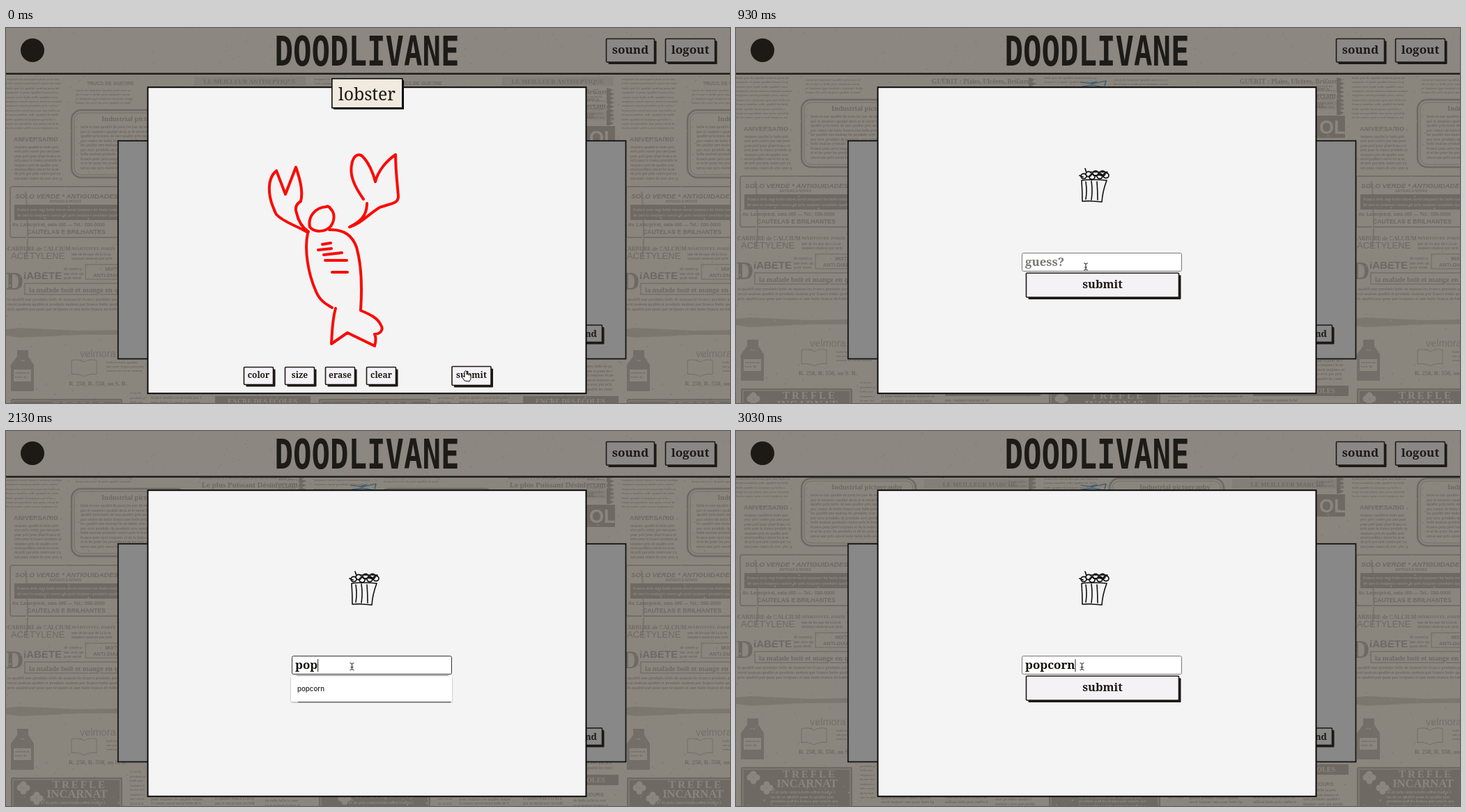
An HTML page that plays this animation: 1039 px wide and 539 px high, repeating every 3180 ms.

```html
<!DOCTYPE html>
<html lang="en">
<head>
<meta charset="utf-8">
<title>Drawing game</title>
<style>
html, body { margin: 0; width: 100%; height: 100%; overflow: hidden; background: #8a857d; }
svg { display: block; width: 100vw; height: 100vh; }
text { white-space: pre; }
.ui { font-family: "Noto Serif", serif; font-weight: 700; fill: #1d1a16; }
.list { font: 500 9.7px Inter, sans-serif; fill: #222; }
.serif { font-family: "Liberation Serif", serif; }
.sans { font-family: "Liberation Sans", sans-serif; }
.b { font-weight: 700; }
.i { font-style: italic; }
.title { font: 700 44px "DejaVu Sans Mono", monospace; fill: #1d1b17; }
.pen { fill: none; stroke-linecap: round; stroke-linejoin: round; }
</style>
</head>
<body>
<svg id="stage" viewBox="0 0 1039 539" preserveAspectRatio="none"></svg>
<script>
const INK = '#6e6a63', PAPER = '#8a857d', DARK = '#1d1a16';

let seed = 11;
const rnd = () => (seed = (seed * 16807) % 2147483647) / 2147483647;

const rect = (x, y, w, h, fill, more = '') =>
  `<rect x="${x}" y="${y}" width="${w}" height="${h}" fill="${fill}" ${more}/>`;
const text = (x, y, str, size, cls = 'ui', more = '') =>
  `<text x="${x}" y="${y}" font-size="${size}" class="${cls}" ${more}>${str}</text>`;
const path = (d, color, width) =>
  `<path class="pen" d="${d}" stroke="${color}" stroke-width="${width}"/>`;
const group = (id, inner) => `<g id="${id}">${inner}</g>`;
const mid = ' text-anchor="middle"';
const ink = `fill="${INK}"`, light = `fill="${PAPER}"`;

function button(x, y, w, h, label, size, fill = '#f4f2f5', depth = 3) {
  return rect(x + depth, y + depth, w, h, DARK, 'rx="1"') +
    rect(x, y, w, h, fill, `stroke="${DARK}" stroke-width="1.6" rx="1"`) +
    text(x + w / 2, y + h / 2 + size * .28, label, size, 'ui', mid);
}

// Paragraph of tiny print, cut to about the given width
const words = 'de la maison pour les produits avec une belle qualité toujours prix franco par boîte et contre envoi'.split(' ');
function print(x, y, w, rows, gap = 6.5, size = 5.5, more = ink) {
  let out = '';
  for (let r = 0; r < rows; r++) {
    let line = '';
    while (line.length < w / size * 2.1) line += words[Math.floor(rnd() * words.length)] + ' ';
    out += text(x, y + r * gap, line.slice(0, w / size * 2.1), size, 'serif b', more);
  }
  return out;
}

function specks(w, h, n, color, size) {
  let d = '';
  for (let i = 0; i < n; i++) {
    const s = size * (.4 + rnd());
    d += `M${(rnd() * w).toFixed(1)} ${(rnd() * h).toFixed(1)}h${s.toFixed(1)}v${s.toFixed(1)}h-${s.toFixed(1)}z`;
  }
  return `<path d="${d}" fill="${color}"/>`;
}

function newsprint() {
  const box = (x, y, w, h, rx = 0, sw = 1) =>
    rect(x, y, w, h, 'none', `stroke="${INK}" stroke-width="${sw}" rx="${rx}"`);
  const banner = (y, str) =>
    rect(270, y, 160, 13, INK, 'opacity=".25"') + text(350, y + 10, str, 9, 'serif b', mid);
  const leaf = (x, y) => [[-5, 0], [5, 0], [0, -5], [0, 5]]
    .map(([a, b]) => `<circle cx="${x + a}" cy="${y + b}" r="4.5" ${light}/>`).join('');
  const zigzag = Array.from({ length: 9 }, (_, i) => `L431 ${89 + i * 6}L424 ${92 + i * 6}`).join('');
  return `<g fill="${INK}">` + [
    specks(442, 620, 600, '#7f7a73', 1.5),
    // top
    text(116, 82, 'TRUCS DE GUERRE', 7, 'sans b'),
    print(0, 75, 86, 12, 6.4, 5),
    print(100, 91, 95, 4, 6, 5),
    banner(70, 'LE MEILLEUR ANTISEPTIQUE'),
    text(354, 95, 'GUÉRIT : Plaies, Ulcères, Brûlures,', 9.5, 'serif b', mid),
    print(278, 104, 150, 1, 6, 6),
    text(350, 116, 'Le plus Puissant Désinfectant', 11, 'serif b', mid),
    banner(119.5, 'LE MEILLEUR MARCHÉ'),
    `<path d="M420 86${zigzag}L420 140Z"/>`,
    print(391, 100, 29, 6, 6, 5),
    rect(345, 141, 87, 32, INK),
    text(395, 167, 'OL', 27, 'sans b', light),
    // framed notice
    box(94, 118, 164, 97, 14, 2.6),
    box(98, 122, 156, 89, 10, .8),
    text(137, 134, 'Industrial pictography', 10.5, 'serif b'),
    print(107, 144, 140, 10, 6.5, 5.6),
    text(11, 163, 'ANIVERSARIO', 9.2, 'sans b'),
    print(12, 173, 75, 8, 6.4, 5.2),
    // antiques
    box(6, 228, 203, 73, 3, 1.4),
    text(13, 244.5, 'SOLO VERDE * ANTIGUIDADES', 9.8, 'sans b i'),
    text(62, 251, 'ANTIGAS E NOVAS', 5, 'sans b'),
    rect(12, 254, 190, 22, INK),
    print(16, 263, 180, 2, 8, 6, light),
    text(9, 285, 'Av. Laranjeiral, sala 000 — Tel.: 000-0000', 6.9, 'sans b'),
    text(30, 296, 'CAUTELAS E BRILHANTES', 8.6, 'sans b'),
    // acetylene
    text(2, 320, 'CARBURE de CALCIUM', 8, 'serif b'),
    text(94, 319, 'MARTOVEL PARIS', 7, 'serif b'),
    text(7, 332, 'ACETYLENE', 13, 'sans'),
    print(94, 327, 68, 2, 6, 5.5),
    // diabetes
    text(0, 376, 'D', 35, 'serif b'),
    text(25, 361, 'IABETE', 15, 'sans b'),
    print(83, 348, 29, 3, 6.5, 5.5),
    box(114, 340, 89, 21),
    text(158, 349, 'MIXTURE', 7, 'sans b', mid),
    text(158, 358, 'ANTI-DIABÉTIQUE', 7.5, 'sans b', mid),
    box(27, 367, 176, 16, 0, 1.2),
    text(33, 380, 'la malade boit et mange en qu.', 10.5, 'serif b'),
    print(2, 392, 198, 3, 7, 6),
    // fountain pen
    '<path d="M0 433L20 431L105 435L203 433L442 432V440L105 441L20 445L0 442Z" opacity=".5"/>',
    text(106, 473, 'velmora de luxe', 14.5, 'sans', 'opacity=".75"'),
    // bottle and book
    '<path d="M16 463h16v9l8 12v38H7V484l9-12z" opacity=".8"/>',
    rect(11, 491, 25, 17, PAPER),
    print(13, 497, 20, 2, 6, 5),
    `<path d="M94 478q10-3 18 2q9-5 18-2v20q-10-2-18 3q-9-5-18-3z" fill="none" stroke="${INK}" opacity=".8"/>`,
    print(144, 482, 58, 3, 6, 5),
    text(90, 514, 'R. 250, R. 550, on S. R.', 8.6, 'serif b'),
    print(178, 526, 24, 9, 6.5, 5),
    // clover
    rect(7, 533, 160, 90, INK, 'rx="2"'),
    box(10, 536, 154, 84).replace(INK, PAPER),
    leaf(25, 548), leaf(44, 563),
    text(106, 548, 'TREFLE', 15, 'serif b', light + mid + ' letter-spacing="3"'),
    text(102, 562, 'INCARNAT', 16.5, 'serif b', light + mid),
    print(50, 571, 110, 4, 6.5, 6, light),
    // bottom middle
    rect(300, 529, 137, 15, INK),
    text(368, 540, 'ENCRE DES ÉCOLES', 10, 'serif b', light + mid),
    print(208, 533, 86, 9, 6.5, 5.5),
    print(300, 552, 70, 6, 6.5, 5.5),
    text(372, 560, 'CONCOURS', 7.5, 'sans b'),
    print(372, 568, 62, 4, 6.5, 5.5),
    print(391, 488, 45, 6, 6.5, 5.5),
    // crease
    `<path d="M30 270q3 30-1 60M28 235l2 20" fill="none" stroke="${INK}" stroke-width="2" opacity=".6"/>`,
    // worn print
    specks(442, 620, 900, PAPER, 1.6)
  ].join('') + '</g>';
}

const lobster = path(
  'M386 207C376 217 375 238 384 259Q386 265 388 268C399 280 418 284 433 294' +
  'M388 205L401 239L416 200C421 215 427 234 423 249Q413 255 417 266C420 280 427 288 434 293' +
  'M436 286C433 271 444 258 459 257Q463 255 466 260C473 267 471 278 466 285C458 294 442 294 436 286' +
  'M433 295C428 318 433 352 445 379C451 393 460 397 468 402' +
  'M464 290C485 289 497 298 503 315C511 343 511 375 509 405' +
  'M454 311L466 309M448 319L467 317M456 326L482 323M458 334L489 334M468 351L490 351' +
  'M473 403C468 420 468 437 467 454L490 438L529 457Q532 446 529 440C538 440 542 433 538 427C533 416 521 411 509 406' +
  'M513 246C501 229 493 213 496 197C498 183 506 179 512 185C520 193 527 208 530 221C534 205 546 191 559 182' +
  'C559 205 562 228 563 242C563 253 552 252 536 258C520 268 508 282 493 286C508 279 518 270 518 252',
  '#fb0a04', 4);

const kernel = (x, y) => `M${x - 4} ${y}a4 3.6 0 1 1 8 0a4 3.6 0 1 1 -8 0`;
const popcorn = path(
  'M496 219Q497 234 497 249Q511 248 525 250Q526 235 532 219Q514 217 496 219' +
  'M502 221Q504 234 502 246M510 220Q512 234 510 247M518 221Q519 234 519 247', '#111', 1.6) +
  path([[499, 213], [506, 210], [511, 214], [516, 209], [522, 213], [526, 209], [531, 212]]
    .map(([x, y]) => kernel(x, y)).join('') +
    'M501 202L503 208M493 212L498 214M508 207H533M513 212L528 211', '#111', 1.7);

const cursors = {
  hand: `<path d="M-3 7L-7 1Q-7-1-4 1L-3 2V-6Q-1-9 0-6V-2Q2-4 3-1Q5-3 6 0V4L4 8Z" fill="#fff" stroke="#111"/>`,
  arrow: `<path d="M0 0V11L2.6 8.6L4.5 12.6L6.3 11.8L4.5 8H8Z" fill="#111" stroke="#fff" stroke-width=".6"/>`,
  beam: path('M-2.5-5Q0-5 0-3.5Q0-5 2.5-5M0-4V4M-2.5 5Q0 5 0 3.5Q0 5 2.5 5M-1.5 1H1.5', '#222', 1)
};

const stage = document.getElementById('stage');
stage.innerHTML = [
  '<defs>', group('tile', newsprint()),
  '<filter id="soft" x="-5%" y="-5%" width="110%" height="115%"><feDropShadow dx="0" dy="1" stdDeviation="1.2" flood-opacity=".35"/></filter></defs>',
  rect(0, 0, 1039, 539, PAPER),
  group('paper', [0, 442, 884].map(x => `<use href="#tile" x="${x}"/>`).join('')),
  // header
  rect(0, 0, 1039, 66, '#8c8780'),
  specks(1039, 63, 200, '#847f78', 1.5),
  rect(0, 64.5, 1039, 2.5, '#211f1b'),
  `<circle cx="38" cy="32" r="17" fill="${DARK}"/>`,
  '<text class="title" text-anchor="middle" transform="translate(518 54) scale(1 1.35)">DOODLIVANE</text>',
  button(861.5, 15.5, 69, 33.5, 'sound', 17, '#8a8886'),
  button(946.5, 15.5, 71, 33.5, 'logout', 17, '#8a8886'),
  // panel behind the dialog
  rect(160.8, 162.2, 728.7, 313.3, '#888', 'stroke="#141414" stroke-width="1.8"'),
  button(796.5, 427, 59, 24.5, '', 13, '#888'),
  text(848, 444, 'send', 13, 'ui', 'text-anchor="end"'),
  group('plane', path('M495 78L512 80L531 76L529 83M497 84L512 82L532 86M508 80L518 77', '#285673', 1.2)),
  rect(203.5, 85.2, 629, 440, '#f4f4f4', 'stroke="#0b0b0b" stroke-width="2"'),
  group('drawing',
    rect(470, 75, 101, 42, '#0b0b0b') +
    rect(467.8, 72.8, 101, 42, '#f1eadf', 'stroke="#0b0b0b" stroke-width="1.6"') +
    text(518, 104, 'lobster', 24.8, 'ui', mid + ' style="font-weight:400"') + lobster),
  group('tools',
    [['color', 341.5], ['size', 400.5], ['erase', 458.5], ['clear', 517.5]]
      .map(([label, x]) => button(x, 487.5, 42, 25, label, 12)).join('') +
    button(640, 486.5, 56, 27, 'submit', 12.4)),
  group('wait', text(517.5, 506, 'waiting for other players...', 23.8, 'ui', mid)),
  group('guess', popcorn + button(416.5, 352.2, 219, 34.8, 'submit', 16.3) +
    rect(410.5, 323.5, 229, 26, '#fff', 'id="field" rx="2"') +
    text(415, 341.5, '', 16.9, 'ui', 'id="typed"')),
  group('menu', ''),
  '<path id="caret" d="M0 328V346" stroke="#222"/>',
  ...Object.entries(cursors).map(([id, shape]) => group(id, shape))
].join('');

const el = id => document.getElementById(id);
const show = (id, on) => { el(id).style.display = on ? '' : 'none'; };

// [first step, cursor, x, y]
const pointer = [
  [0, 'hand', 661, 500], [2, 'hand', 657, 488], [3, 'arrow', 630, 446], [4, 'arrow', 591, 390],
  [5, 'arrow', 546, 362], [6, 'beam', 502, 343], [7, 'beam', 498, 340], [8, 'beam', 496.5, 338.5]
];
const guesses = ['donut', 'popcorn', 'mime', 'bagel', 'whoops', 'dragon'];

function menu(items) {
  if (!items.length) return '';
  const h = items.length > 1 ? 169 : 37;
  return rect(409, 352, 231, h, '#fff', 'rx="2" filter="url(#soft)"') +
    (items.length > 1 ? '' : rect(419, 389, 219, 1.2, '#55534f')) +
    items.map((s, i) => `<text class="list" x="418" y="${374.3 + i * 26.4}">${s}</text>`).join('');
}

function pose(step) {
  el('paper').setAttribute('transform', `translate(0 ${-2.5 * step})`);
  const guessing = step >= 6, focused = step >= 8;
  show('drawing', !guessing);
  show('tools', step < 2);
  show('wait', step >= 2 && !guessing);
  show('guess', guessing);
  show('plane', guessing);
  show('caret', focused);

  const typed = 'popcorn'.slice(0, Math.max(0, step - 11));
  const label = el('typed');
  label.textContent = typed || 'guess?';
  label.style.fill = typed ? '#14120f' : '#7a7876';
  const end = typed ? label.getComputedTextLength() : 0;
  el('caret').setAttribute('transform', `translate(${415.5 + end} 0)`);

  const open = focused && step < 20;
  el('field').setAttribute('stroke', open ? '#333' : '#777');
  el('menu').innerHTML = menu(open ? guesses.filter(g => !typed || g.startsWith(typed)) : []);

  const [, kind, x, y] = pointer.filter(p => p[0] <= step).pop();
  for (const id in cursors) show(id, id === kind);
  el(kind).setAttribute('transform', `translate(${x} ${y})`);
}

let last = -1;
const start = performance.now();
function tick() {
  const t = (performance.now() - start) % 3180;
  const step = t < 180 ? 0 : 1 + Math.floor((t - 180) / 150);
  if (step !== last) pose(last = step);
  requestAnimationFrame(tick);
}
pose(0);
requestAnimationFrame(tick);
</script>
</body>
</html>
```
